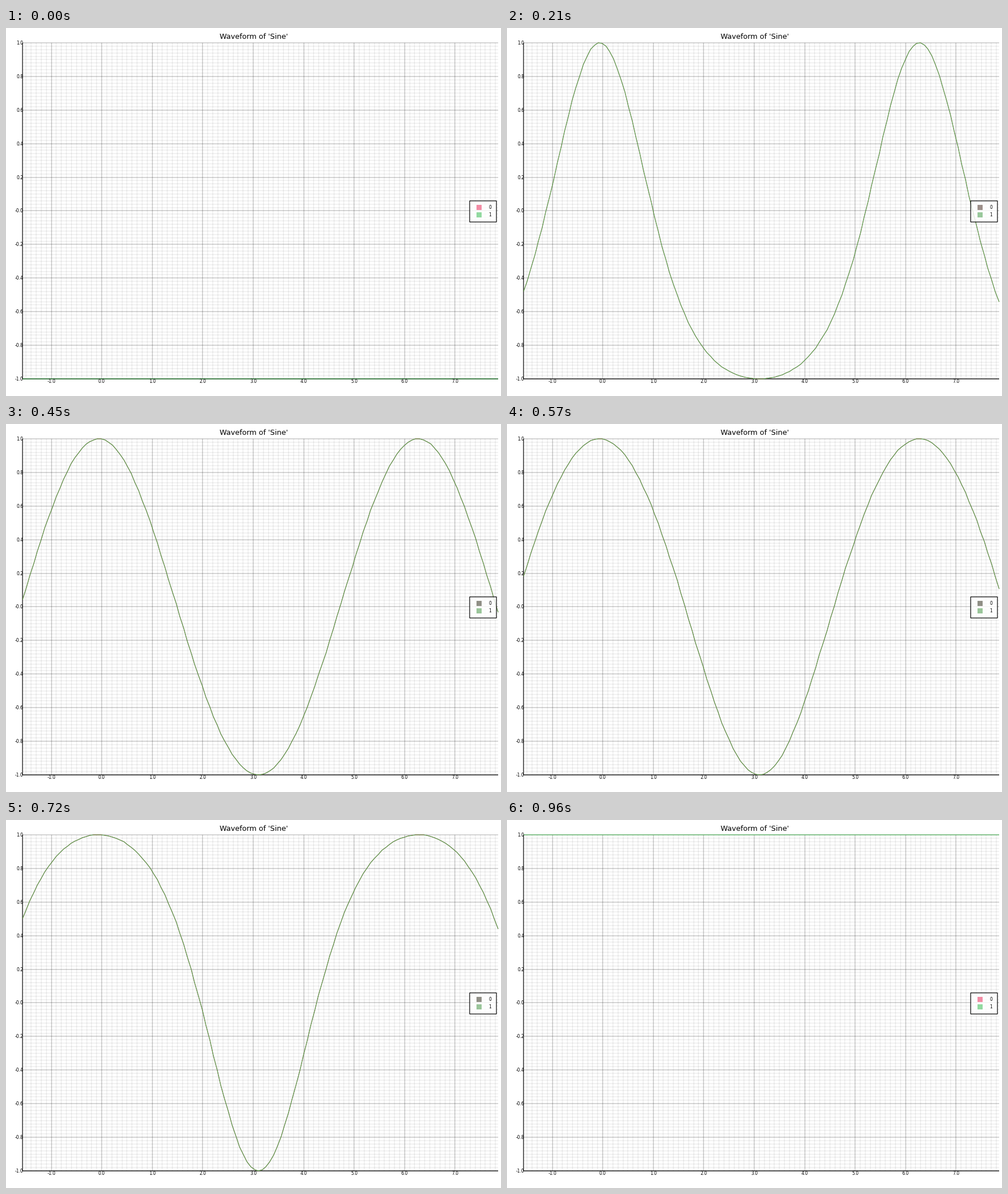
A matplotlib script for the animation above (990 ms loop, 869 by 645 pixels).

```python
import numpy as np
import matplotlib.pyplot as plt
from matplotlib.animation import FuncAnimation
from matplotlib.colors import to_rgb
from matplotlib.patches import Rectangle

W, H, DPI = 869, 645, 100
FRAMES, INTERVAL = 33, 30
LEFT, RIGHT, TOP, BOTTOM = 29, 864, 26, 615
SAMPLES = 128
X_MIN, X_SPAN = -np.pi / 2, 3 * np.pi


def px(size):
    """Pixels to points."""
    return size * 72 / DPI


def to_x(value):
    return np.round(LEFT + (RIGHT - LEFT) * (value - X_MIN) / X_SPAN)


def to_y(value):
    return np.round(TOP + (BOTTOM - TOP) * (1 - value) / 2)


def mix(a, b, t):
    return tuple((1 - t) * np.array(to_rgb(a)) + t * np.array(to_rgb(b)))


fig = plt.figure(figsize=(W / DPI, H / DPI), dpi=DPI, facecolor="white")
ax = fig.add_axes([0, 0, 1, 1])
ax.set_xlim(0, W)
ax.set_ylim(H, 0)
ax.axis("off")


def line(xs, ys, z=1, width=1.0, **style):
    return ax.plot(xs, ys, lw=px(width), zorder=z, snap=False,
                   solid_capstyle="butt", **style)[0]


def text(x, y, s, size=7.7, align="center"):
    ax.text(x, y, s, fontsize=px(size), family="DejaVu Sans", color="black",
            ha=align, va="baseline", zorder=6)


def draw_grid():
    for i in range(-15, 79):
        x = to_x(i / 10)
        line([x, x], [TOP, BOTTOM], color="black", alpha=0.1 if i % 10 else 0.33)
        if i % 10 == 0:
            text(x, 621.6, f"{i / 10:.1f}")
    for j in range(-50, 51):
        y = to_y(j / 50)
        line([LEFT, RIGHT], [y, y], color="black", alpha=0.1 if j % 10 else 0.33)
        if j % 10 == 0:
            text(30.2, y + 2.9, f"{j / 50 if j else -0.0:.1f}", align="right")
    line([LEFT, LEFT], [TOP, BOTTOM], 2, 1.2, color="black")
    line([LEFT, RIGHT], [BOTTOM, BOTTOM], 2, 1.2, color="black")


def draw_legend():
    ax.add_patch(Rectangle((814, 303), 47, 37, fc=(1, 1, 1, 0.8), ec="black",
                           lw=px(1.2), zorder=4, snap=False))
    swatches = []
    for k in range(2):
        y = 309.5 + 13 * k
        box = Rectangle((826, y), 9, 9, lw=0, zorder=5)
        swatches.append(ax.add_patch(box))
        text(850, y + 7.4, str(k))
    return swatches


def bend(u, p):
    """Exponential curve on 0..1; p moves it from all low to all high."""
    if p in (0, 1):
        return np.full_like(u, p)
    d = p - 0.5
    k = -1.88 * d / (0.5 - abs(d))
    if abs(k) < 1e-9:
        return u
    return np.expm1(k * u) / np.expm1(k)


draw_grid()
text(434.7, 19.4, "Waveform of 'Sine'", 12.7)
red_box, green_box = draw_legend()

wave_x = np.round(np.linspace(LEFT, RIGHT, SAMPLES))
theta = X_MIN + X_SPAN * np.arange(1, SAMPLES + 1) / SAMPLES
level = (1 + np.cos(theta)) / 2
red_wave = line(wave_x, level, 3, color="#e6194b")
green_wave = line(wave_x, level, 3, color="#3cb44b")


def update(i):
    last = FRAMES - 1
    ys = to_y(2 * bend(level, i / last) - 1)
    red_wave.set_ydata(ys)
    green_wave.set_ydata(ys)
    # colours are vivid at both ends of the sweep and dull in between
    vivid = max(0, 1 - min(i, last - i) / 8)
    red_wave.set_alpha(1 - vivid)
    red_box.set_facecolor(mix("#908f86", "#f28ca5", vivid))
    green_box.set_facecolor(mix("#9ac59a", "#92d9a0", vivid))
    return red_wave, green_wave, red_box, green_box


anim = FuncAnimation(fig, update, frames=FRAMES, interval=INTERVAL,
                     repeat=True, repeat_delay=0, blit=False)
plt.show()
```
